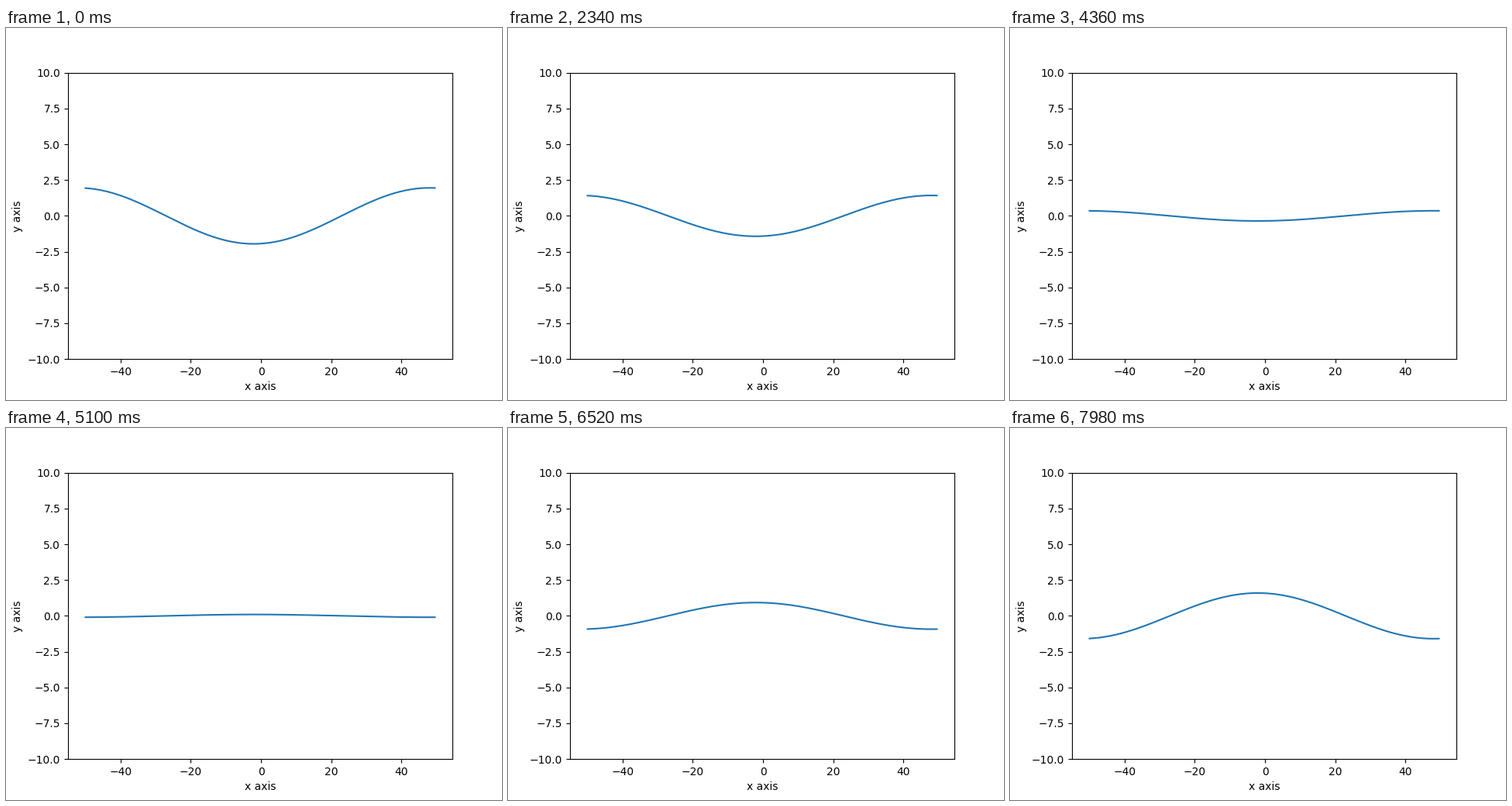
Write a matplotlib script that moves like this. It is 640 by 480 pixels and loops after 8000 ms.

```python
import numpy as np
import matplotlib.pyplot as plt
from matplotlib.animation import FuncAnimation

FRAMES = 400
INTERVAL = 20      # ms
AMP = 1.955
OMEGA = 2 * np.pi / 1000   # radians per frame
PHASE = 0.018
CREST = -2.1       # x of the central antinode
WAVELENGTH = 100

x = np.arange(-50, 50, 0.5)
shape = -AMP * np.cos(2 * np.pi * (x - CREST) / WAVELENGTH)


def wave(i):
    """Standing wave at frame i."""
    return shape * np.cos(OMEGA * i + PHASE)


fig, ax = plt.subplots(figsize=(6.4, 4.8), dpi=100)
line, = ax.plot(x, wave(0))
ax.set_ylim(-10, 10)
ax.set_xlabel("x axis")
ax.set_ylabel("y axis")


def update(i):
    line.set_ydata(wave(i))
    return line,


anim = FuncAnimation(fig, update, frames=FRAMES, interval=INTERVAL,
                     repeat=True, repeat_delay=0, blit=True)
plt.show()
```
